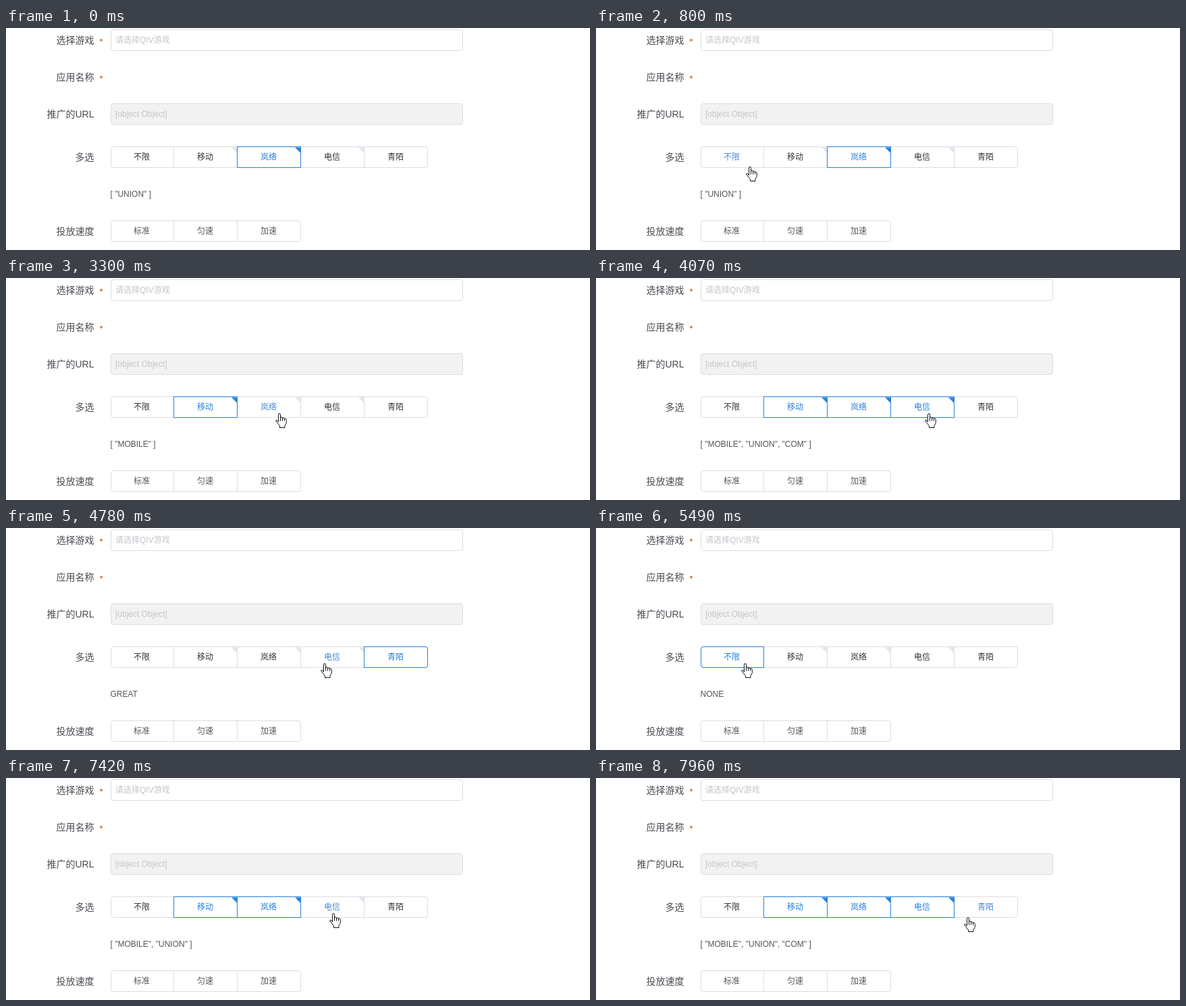
An HTML page that plays this animation: 865x330 px, repeating every 8000 ms.

```html
<!DOCTYPE html>
<html lang="zh-CN">
<head>
<meta charset="utf-8">
<style>
  html, body { margin: 0; width: 100%; height: 100%; overflow: hidden; background: #fff; }
  svg { display: block; }
  text { font: 12px "Liberation Sans", "Noto Sans CJK SC", "Noto Sans CJK", sans-serif; white-space: pre; }
  .label { font-size: 14px; fill: #484c52; text-anchor: end; }
  .hint { fill: #c2c5ca; }
  .option { text-anchor: middle; fill: #333; }
  .muted { fill: #555; }
  .box { fill: #fff; stroke: #dcdddf; }
  .disabled { fill: #f2f2f2; }
  .frame { fill: none; stroke: #2681dc; }
</style>
</head>
<body>
<svg id="stage" width="865" height="330" viewBox="0 0 865 330"></svg>
<script>
const LOOP = 8000, FIRST_TICK = 190, TICK = 77.7;
const LEFT = 155.5, CELL = 94, TOP = 176.5, HEIGHT = 31, RADIUS = 3.5;
const BLUE = '#2681dc', HOVER_BLUE = '#4788d6', PALE = '#dce6f4', DARK = '#333';
const stage = document.getElementById('stage');

function add(tag, attrs, content = '') {
  const node = document.createElementNS('http://www.w3.org/2000/svg', tag);
  for (const key in attrs) node.setAttribute(key, attrs[key]);
  node.textContent = content;
  return stage.appendChild(node);
}
const write = (x, y, kind, content) => add('text', { x, y, class: kind }, content);
const box = (y, width, kind = '') =>
  add('rect', { x: LEFT, y, width, height: HEIGHT, rx: RADIUS, class: 'box ' + kind });

// Cells share their borders; the first one starts a pixel late
const edge = i => i ? LEFT - 1 + CELL * i : LEFT;

function buttonRow(y, names, kind) {
  box(y, CELL * names.length - 1);
  return names.map((name, i) => {
    if (i) add('path', { d: `M${edge(i)} ${y}v${HEIGHT}`, class: 'box' });
    return write(edge(i + 1) - CELL / 2 - 0.5, y + 19.5, 'option ' + kind, name);
  });
}

// Outline of one cell, rounded on the outer side of the row only
function cellPath(i, last) {
  const l = i === 0 ? RADIUS : 0, r = i === last ? RADIUS : 0;
  const x1 = edge(i), x2 = edge(i + 1), bottom = TOP + HEIGHT;
  return `M${x1 + l} ${TOP}H${x2 - r}Q${x2} ${TOP} ${x2} ${TOP + r}V${bottom - r}` +
    `Q${x2} ${bottom} ${x2 - r} ${bottom}H${x1 + l}Q${x1} ${bottom} ${x1} ${bottom - l}` +
    `V${TOP + l}Q${x1} ${TOP} ${x1 + l} ${TOP}z`;
}

['选择游戏', '应用名称', '推广的URL'].forEach((name, i) => write(130.5, 23 + 55 * i, 'label', name));
['多选', '投放速度'].forEach((name, i) => write(130.5, 197 + 110 * i, 'label', name));
for (const cy of [18, 73]) add('circle', { cx: 141, cy, r: 2, fill: '#d58b52' });

box(2.5, 521);
write(162, 22, 'hint', '请选择QIV游戏');
box(112.5, 521, 'disabled');
write(162, 132, 'hint', '[object Object]');
buttonRow(286.5, ['标准', '匀速', '加速'], 'muted');

const options = buttonRow(TOP, ['不限', '移动', '岚络', '电信', '青陌'], '');
const codes = ['NONE', 'MOBILE', 'UNION', 'COM', 'GREAT'];
const isExclusive = i => i === 0 || i === codes.length - 1;

const corners = options.map((_, i) => isExclusive(i) ? null :
  add('path', { d: `M${edge(i + 1) - 8.5} ${TOP + 1}h8v8z` }));
const frames = options.map((_, i) => add('path', { d: cellPath(i, codes.length - 1), class: 'frame' }));
const result = write(154.5, 251, 'muted', '');
const hand = add('path', {
  d: 'M4.5 13V2.2Q4.5.5 6 .5T7.5 2.2V7Q7.8 5.8 9 5.8T10.5 7.2V8Q10.8 6.8 12 6.8T13.5 8.2V9' +
     'Q13.8 8 14.9 8T16.3 9.5V14.5L14 18.5V21.5H6.5V18.8L3.5 15 .8 11.8Q.3 9.8 2.3 10.2Z' +
     'M7.5 7V11.5M10.5 8V11.5M13.5 9V11.5',
  fill: '#fff', stroke: '#111', 'stroke-linejoin': 'round'
});

// The pointer glides to each x and clicks there; times are in ticks
const entry = { x: 710, y: 340 }, restY = 201;
const visits = [
  { leave: -1, arrive: 10, click: 13, x: 186 },
  { leave: 18, arrive: 21, click: 31, x: 307 },
  { leave: 33, arrive: 38, click: 43, x: 404 },
  { leave: 43, arrive: 50, click: 50, x: 492 },
  { leave: 50, arrive: 54, click: 57, x: 586 },
  { leave: 57, arrive: 66, click: 68, x: 220 },
  { leave: 73, arrive: 78, click: 80, x: 307 },
  { leave: 85, arrive: 88, click: 90, x: 374 },
  { leave: 90, arrive: 93, click: 96, x: 484 },
  { leave: 96, arrive: 100, x: 550, y: 207 }
];
const optionAt = x => Math.floor((x - LEFT) / CELL);

function pointerAt(tick) {
  let { x, y } = entry;
  for (const visit of visits.filter(v => v.leave <= tick)) {
    const { leave, arrive, y: toY = restY } = visit;
    const rest = Math.max(0, (arrive - tick) / (arrive - leave));
    x = visit.x + (x - visit.x) * rest ** 1.5;
    y = toY + (y - toY) * rest ** 2;
  }
  return { x: Math.round(x), y: Math.round(y) };
}

// An exclusive option replaces the selection, any other joins it
function selectionAt(tick) {
  return visits.filter(v => v.click <= tick).map(v => optionAt(v.x)).reduce(
    (chosen, i) => isExclusive(i) ? [i] : [...chosen.filter(c => !isExclusive(c)), i], [2]);
}

function draw() {
  const time = performance.now() % LOOP;
  const tick = Math.floor((time - FIRST_TICK) / TICK + 0.15);
  const { x, y } = pointerAt(tick);
  const selected = selectionAt(tick);
  const hovered = y > TOP && y < TOP + HEIGHT ? optionAt(x) : -1;

  options.forEach((option, i) => {
    const on = selected.includes(i);
    option.style.fill = on ? BLUE : i === hovered ? HOVER_BLUE : DARK;
    frames[i].style.display = on ? '' : 'none';
    if (corners[i]) corners[i].style.fill = on ? BLUE : PALE;
  });
  result.textContent = isExclusive(selected[0])
    ? codes[selected[0]]
    : `[ ${selected.map(i => `"${codes[i]}"`).join(', ')} ]`;
  hand.setAttribute('transform', `translate(${x - 5} ${y})`);
  requestAnimationFrame(draw);
}
draw();
</script>
</body>
</html>
```
